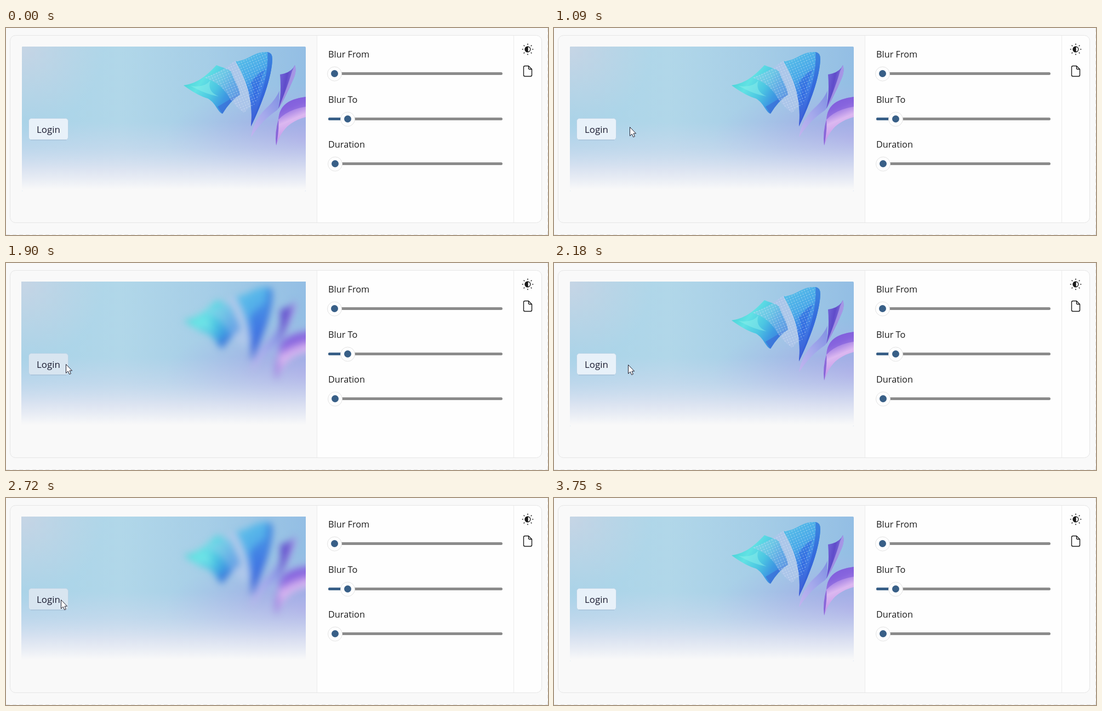
An HTML page for the animation above (4080 ms loop, 989 by 379 pixels).

```html
<!DOCTYPE html>
<html lang="en">
<head>
<meta charset="utf-8">
<title>Blur on hover</title>
<style>
  html, body { margin: 0; width: 100%; height: 100%; overflow: hidden; background: #f9f9f9; }
  svg { display: block; }
  text { font: 16.3px "Open Sans", "Noto Sans", sans-serif; fill: #1b1b1b; }
  #login text { font-size: 16.9px; fill: #1a1b30; }
</style>
</head>
<body>
<svg width="989" height="379" viewBox="0 0 989 379">
  <defs>
    <linearGradient id="sky">
      <stop offset="0" stop-color="#a8d3e8"/>
      <stop offset=".35" stop-color="#b1d7e9"/>
      <stop offset=".65" stop-color="#a6cee7"/>
      <stop offset="1" stop-color="#93bee4"/>
    </linearGradient>
    <radialGradient id="haze" gradientUnits="userSpaceOnUse" cx="29" cy="34" r="150">
      <stop offset="0" stop-color="#c6d5e5"/>
      <stop offset="1" stop-color="#c6d5e5" stop-opacity="0"/>
    </radialGradient>
    <radialGradient id="violet" gradientUnits="userSpaceOnUse" cx="0" cy="0" r="1"
      gradientTransform="translate(560 205) scale(270 105)">
      <stop offset="0" stop-color="#a3a4e6"/>
      <stop offset=".4" stop-color="#a5ade6" stop-opacity=".75"/>
      <stop offset="1" stop-color="#a8b8e8" stop-opacity="0"/>
    </radialGradient>
    <linearGradient id="fade" x1="0" y1="0" x2="0" y2="1">
      <stop offset=".52" stop-color="#d2d6f0" stop-opacity="0"/>
      <stop offset=".7" stop-color="#d6dcf0" stop-opacity=".45"/>
      <stop offset=".85" stop-color="#e6e7f3" stop-opacity=".82"/>
      <stop offset=".99" stop-color="#f9f9f9"/>
    </linearGradient>
    <linearGradient id="teal" x1="0" y1=".2" x2="1" y2=".75">
      <stop offset="0" stop-color="#42cfd5"/>
      <stop offset=".3" stop-color="#62e2e4"/>
      <stop offset=".55" stop-color="#4cc6e2"/>
      <stop offset=".75" stop-color="#3e9be2"/>
      <stop offset="1" stop-color="#3a78dc"/>
    </linearGradient>
    <linearGradient id="blue" x1=".2" y1="0" x2=".6" y2="1">
      <stop offset="0" stop-color="#58c0e8"/>
      <stop offset=".35" stop-color="#4aa9e8"/>
      <stop offset=".6" stop-color="#3c79e4"/>
      <stop offset="1" stop-color="#3f55d2"/>
    </linearGradient>
    <linearGradient id="edge" x1=".3" y1="0" x2="1" y2=".1">
      <stop offset=".4" stop-color="#2c62d8" stop-opacity="0"/>
      <stop offset="1" stop-color="#2c5bd6" stop-opacity=".85"/>
    </linearGradient>
    <linearGradient id="indigo" x1="0" y1="0" x2="1" y2=".5">
      <stop offset="0" stop-color="#7a70dc"/>
      <stop offset=".5" stop-color="#5f4bca"/>
      <stop offset="1" stop-color="#9b8be4"/>
    </linearGradient>
    <linearGradient id="lilac" x1="1" y1="0" x2="0" y2="1">
      <stop offset="0" stop-color="#7f8fe2"/>
      <stop offset=".55" stop-color="#a6aaec"/>
      <stop offset="1" stop-color="#c4b4ee"/>
    </linearGradient>
    <linearGradient id="pink" x1=".1" y1="0" x2=".5" y2="1">
      <stop offset="0" stop-color="#7657d8"/>
      <stop offset=".28" stop-color="#9674e2"/>
      <stop offset=".5" stop-color="#dcb8f0"/>
      <stop offset=".72" stop-color="#c9a0ec"/>
      <stop offset="1" stop-color="#8f68dc"/>
    </linearGradient>
    <pattern id="dots" width="5" height="5" patternUnits="userSpaceOnUse" patternTransform="rotate(-24)">
      <circle cx="2" cy="2" r=".75" fill="#e4f0fa" fill-opacity=".85"/>
    </pattern>
    <filter id="blur" filterUnits="userSpaceOnUse" x="280" y="0" width="340" height="270"
      color-interpolation-filters="sRGB">
      <feGaussianBlur stdDeviation="0"/>
    </filter>
    <clipPath id="frame"><rect x="29" y="34" width="518" height="265" rx="2"/></clipPath>
    <clipPath id="card"><rect x="7.5" y="13.5" width="970" height="343" rx="10"/></clipPath>
  </defs>

  <rect width="989" height="379" fill="#f9f9f9"/>
  <path d="M0 378.5H989M988.5 0V379" stroke="#e2e2e2" stroke-dasharray="7 5"/>
  <rect x="567" y="13" width="411" height="344" fill="#fefefe" clip-path="url(#card)"/>
  <path d="M567.5 14V356M926.5 14V356" stroke="#ebebeb"/>
  <rect x="7.5" y="13.5" width="970" height="343" rx="10" fill="none" stroke="#e6e6e6"/>

  <g clip-path="url(#frame)">
    <g id="backdrop"></g>
    <g id="ribbons">
      <path d="M362 91Q390 82 418 60Q432 92 456 132L434 155Q414 140 404 122Q390 100 362 91Z" fill="#b0c4e8" fill-opacity=".75"/>
      <path d="M324 105C345 102 362 92 384 68C396 73 405 74 411 80C417 98 425 107 427 122Q409 134 395 157C386 154 383 137 368 129Q350 124 324 105Z" fill="url(#teal)"/>
      <path d="M337 106Q362 110 373 96Q366 116 388 125Q366 122 337 106Z" fill="#8cf0ec" fill-opacity=".5"/>
      <path d="M386 144Q402 135 425 120Q409 134 395 157Z" fill="#3c62d6" fill-opacity=".5"/>
      <path d="M362 91Q390 82 418 60Q432 92 456 132L434 155Q414 140 404 122Q390 100 362 91Z" fill="#a9c7ea" fill-opacity=".35"/>
      <path id="sheet" d="M419 61C443 60 451 43 477 44Q486 45 486 57C485 89 468 137 447 180C451 144 444 101 419 61Z" fill="url(#blue)"/>
      <use href="#sheet" style="fill:url(#edge)"/>
      <path d="M477 44Q486 45 486 57C485 89 468 137 447 180C464 133 480 84 477 44Z" fill="#2e60d8" fill-opacity=".55"/>
      <path d="M447 100Q460 82 473 76Q458 103 455 142Q454 119 447 100Z" fill="#2d60e0" fill-opacity=".5"/>
      <path d="M362 91Q390 82 418 60C443 60 451 43 477 44Q480 85 457 137L434 155Q414 140 404 122Q390 100 362 91Z" fill="url(#dots)"/>
      <path d="M499 115C497 128 502 145 494 151Q468 168 447 200Q452 166 480 142Q492 130 499 115Z" fill="url(#lilac)"/>
      <path d="M500 85Q521 82 527 68Q531 78 525 92Q513 121 497 148Q503 120 500 85Z" fill="url(#indigo)"/>
      <path d="M527 68Q531 78 525 92Q513 121 497 148Q515 104 522 79Z" fill="#b2a3ea" fill-opacity=".75"/>
      <path d="M580 123L547 126C520 130 499 138 497 168Q490 190 493 215Q502 187 520 175Q534 166 547 163L580 160Z" fill="url(#pink)"/>
      <path d="M580 123L547 126C520 130 499 138 497 168Q514 149 547 144L580 142Z" fill="#7d5adc" fill-opacity=".6"/>
      <path d="M493 215Q490 190 497 168Q499 185 493 215Z" fill="#6c4cd0" fill-opacity=".7"/>
    </g>
  </g>

  <g id="login">
    <rect x="41.5" y="165.5" width="72" height="39.5" rx="5" fill="#e8f1f9" stroke="#b9d3e6"/>
    <path d="M45 205H110" stroke="#9fb9d2"/>
    <text x="56" y="192">Login</text>
  </g>

  <g id="sliders"></g>

  <g stroke="#1b1b1b" fill="none" stroke-width="1.4">
    <circle cx="952" cy="39" r="4.8"/>
    <path d="M952 34.2A4.8 4.8 0 0 0 952 43.8Z" fill="#1b1b1b"/>
    <g id="rays" stroke-linecap="round" stroke-width="1.5"></g>
    <path d="M947 69.5H953.5L959.5 75.5V86Q959.5 88.5 957 88.5H947Q944.5 88.5 944.5 86V72Q944.5 69.5 947 69.5ZM953.5 69.5V73.5Q953.5 75.5 955.5 75.5H959.5" stroke-linejoin="round"/>
  </g>

  <path id="cursor" d="M.5.5V16.6L4.2 13.1L6.7 18.7L9.4 17.5L7 12.1H11.6Z" fill="#fff" stroke="#1c1c2c" stroke-linejoin="round"/>
</svg>

<script>
const LOOP = 4080, STEP = 68, SHOW = 390, HIDE = 3732;
const STARTS = [SHOW, 1900, 3120];
const BUTTON_RIGHT = 113;

// [time, x, y] of the pointer tip
const POINTER = [
  [390, 574, 362], [458, 470, 300], [526, 385, 255], [594, 318, 228], [662, 265, 209],
  [730, 225, 195], [798, 203, 189], [866, 187, 185], [1070, 138, 181], [1206, 112, 181],
  [1274, 102, 182], [1410, 99, 184], [1832, 99, 184], [1900, 109, 185], [2036, 126, 186],
  [2172, 135, 186], [2240, 136, 186], [2376, 120, 186], [2512, 107, 186], [2716, 100, 186],
  [2920, 99, 187], [3052, 99, 187], [3120, 114, 188], [3188, 143, 190], [3256, 181, 193],
  [3392, 295, 228], [3596, 584, 318], [3664, 643, 354]
];

// [time, blur radius]
const BLUR = [
  [1138, 0], [1274, 3], [1410, 6.5], [1900, 6.5], [2036, 2], [2172, 0],
  [2376, 0], [2716, 6.5], [3052, 6.5], [3256, 3], [3392, .5], [3460, 0]
];

const $ = selector => document.querySelector(selector);
const backdrop = ["sky", "haze", "violet", "fade"];
$("#backdrop").innerHTML = backdrop.map(id =>
  `<rect x="28" y="34" width="519" height="265" fill="url(#${id})"/>`).join("");

const slider = (label, baseline, x, y, filled) => `
  <text x="588" y="${baseline}">${label}</text>
  <rect x="588" y="${y - 2.5}" width="318" height="5" rx="2.5" fill="#8b8b8b"/>
  ${filled ? `<rect x="588" y="${y - 2.5}" width="${x - 588}" height="5" rx="2.5" fill="#385f87"/>` : ""}
  <circle cx="${x}" cy="${y + .5}" r="13" fill="#fefefe" stroke="#e3e3e3"/>
  <circle cx="${x}" cy="${y}" r="6.5" fill="#385f87"/>`;
$("#sliders").innerHTML =
  slider("Blur From", 54, 599.5, 83.5) +
  slider("Blur To", 137, 623.5, 166.5, true) +
  slider("Duration", 219, 600.5, 248.5);

$("#rays").innerHTML = Array.from({ length: 8 }, (_, i) =>
  `<path d="M952 30.2v-.9" transform="rotate(${i * 45} 952 39)"/>`).join("");

function sample(keys, time) {
  const next = keys.findIndex(key => key[0] > time);
  if (next < 0) return keys.at(-1).slice(1);
  if (next === 0) return keys[0].slice(1);
  const a = keys[next - 1], b = keys[next];
  const k = (time - a[0]) / (b[0] - a[0]);
  return a.slice(1).map((v, i) => v + (b[i + 1] - v) * k);
}

function snap(time) {
  const start = STARTS.filter(s => s <= time).at(-1) ?? 0;
  return start + Math.floor((time - start) / STEP) * STEP;
}

const cursor = $("#cursor"), ribbons = $("#ribbons"), clip = $("#frame rect");
const gauss = $("#blur feGaussianBlur"), button = $("#login rect");

function draw(time) {
  const t = snap(time);
  const [x, y] = sample(POINTER, t).map(Math.round);
  const [radius] = sample(BLUR, t);
  const visible = t >= SHOW && t < HIDE;
  const blurred = radius > 0;

  cursor.setAttribute("visibility", visible ? "visible" : "hidden");
  cursor.setAttribute("transform", `translate(${x} ${y})`);
  button.setAttribute("fill", visible && x < BUTTON_RIGHT ? "#d8e5f0" : "#e8f1f9");

  gauss.setAttribute("stdDeviation", radius);
  ribbons.setAttribute("filter", blurred ? "url(#blur)" : "none");
  clip.setAttribute("x", blurred ? 28 : 29);
  clip.setAttribute("width", blurred ? 519 : 518);
  clip.setAttribute("rx", blurred ? 0 : 2);
}

const origin = performance.now();
function tick() {
  draw((performance.now() - origin) % LOOP);
  requestAnimationFrame(tick);
}
tick();
</script>
</body>
</html>
```
